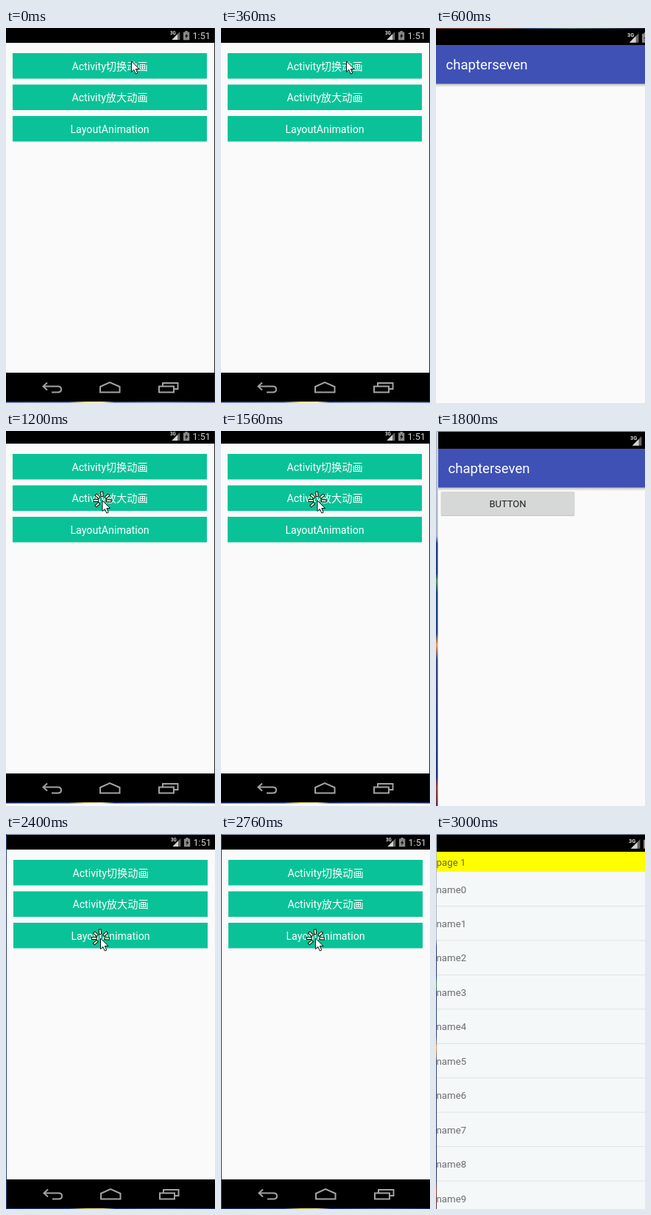
Animation of 284 by 507 pixels, one loop 3.6 s. Source, as an HTML page:

```html
<!DOCTYPE html>
<html lang="zh">
<head>
<meta charset="utf-8">
<title>Activity animations</title>
<style>
html, body { margin: 0; width: 100%; height: 100%; overflow: hidden; background: #fafafa; }
svg { display: block; width: 284px; height: 507px; }
text { font-family: Roboto, "Noto Sans CJK SC", "Noto Sans CJK", sans-serif; white-space: pre; }
.scene { visibility: hidden; }
</style>
</head>
<body>
<svg id="stage" viewBox="0 0 284 507">
  <defs>
    <linearGradient id="shade" x2="0" y2="1">
      <stop stop-color="#777"/>
      <stop offset=".3" stop-color="#ccc"/>
      <stop offset="1" stop-color="#fafafa"/>
    </linearGradient>
    <linearGradient id="wallH">
      <stop stop-color="#16306e"/>
      <stop offset=".3" stop-color="#24417f"/>
      <stop offset=".38" stop-color="#e4d36a"/>
      <stop offset=".46" stop-color="#e4d9a0"/>
      <stop offset=".52" stop-color="#1c3676"/>
      <stop offset=".76" stop-color="#3d5796"/>
      <stop offset="1" stop-color="#16306e"/>
    </linearGradient>
    <linearGradient id="wallTop">
      <stop stop-color="#7a4a3c"/>
      <stop offset=".3" stop-color="#8a4a38"/>
      <stop offset=".45" stop-color="#3b5f86"/>
      <stop offset=".65" stop-color="#4d7f90"/>
      <stop offset="1" stop-color="#1c2a4c"/>
    </linearGradient>
    <linearGradient id="wallV" x2="0" y2="1">
      <stop stop-color="#b9bfd0"/>
      <stop offset=".28" stop-color="#a9b2c8"/>
      <stop offset=".3" stop-color="#203a80"/>
      <stop offset=".38" stop-color="#203a80"/>
      <stop offset=".4" stop-color="#4f9a5c"/>
      <stop offset=".43" stop-color="#24407f"/>
      <stop offset=".54" stop-color="#24407f"/>
      <stop offset=".57" stop-color="#f0a050"/>
      <stop offset=".61" stop-color="#30487f"/>
      <stop offset=".92" stop-color="#1c3474"/>
      <stop offset=".95" stop-color="#a03c3c"/>
      <stop offset="1" stop-color="#5a2c48"/>
    </linearGradient>
  </defs>
</svg>
<script>
const STEP = 600;
const stage = document.getElementById('stage');

const rect = (x, y, w, h, fill, extra = '') =>
  `<rect x="${x}" y="${y}" width="${w}" height="${h}" fill="${fill}" ${extra}/>`;
const path = (d, attrs) => `<path d="${d}" ${attrs}/>`;
const text = (x, y, size, fill, str, extra = '') =>
  `<text x="${x}" y="${y}" font-size="${size}" fill="${fill}" ${extra}>${str}</text>`;
const at = (x, y, body, scale = 1) =>
  `<g transform="translate(${x} ${y}) scale(${scale})">${body}</g>`;

// Status icons, measured from the left edge of "3G"
const signal =
  text(0, 5.6, 6.6, '#ddd', '3G', 'font-weight="700" textLength=""') +
  path('M2.5 12.5L14 1V12.5Z', 'fill="#666"') +
  path('M2.5 12.5L10.5 4.5V12.5Z', 'fill="#d4d4d4"');
const battery =
  path('M2.5 0H6V1.5H8.5V12.5H0V1.5H2.5Z', 'fill="#8a8a8a"') +
  path('M5.5 3L2 7.5H4L3 11L6.8 6.3H4.7Z', 'fill="#111"');

const nav = at(0, 466,
  rect(0, 0, 283, 39, '#000') +
  `<g fill="none" stroke="#a2a2a2" stroke-width="2">` +
  path('M56 13.5L50.5 18.5L56 23.5M51 18.5H70.5Q75 18.5 75 22.5Q75 26.5 70.5 26.5H62', '') +
  path('M128 26.5V19L141 13L154.500 19V26.500Z', '') +
  path('M208 18.500H228V26.500H208ZM213 18V14H233.500V22H229', '') +
  '</g>');

const button = (y, label) =>
  rect(9, y, 264, 34.5, '#0ac298') +
  text(141, y + 22.5, 14.2, '#fff', label, 'text-anchor="middle"');

const arrow = path('M0 0V14.5L3.3 11.4L5.8 17L8.200 16L5.800 10.500H10.500Z',
  'fill="#fff" stroke="#111" stroke-width="1"');

function rays() {
  const angles = [180, 222, 266, 318, 2, 140];
  return angles.map(a =>
    `<g transform="rotate(${a})">` +
    rect(5.5, -1.5, 6.5, 3, '#fff2c4', 'stroke="#111" stroke-width="1"') + '</g>').join('');
}

function home(dx, dy, cursor) {
  return at(dx, dy,
    rect(0, 0, 284, 20, '#000') +
    rect(0, 20, 283, 446, '#fafafa') +
    rect(0, 20, 283, 1, '#e2e2e2') +
    at(223, 4, signal, .95) +
    at(241, 4, battery, .97) +
    text(253.5, 15, 12.6, '#d0d0d0', '1:51') +
    button(34, 'Activity切换动画') +
    button(76.5, 'Activity放大动画') +
    button(119, 'LayoutAnimation') +
    nav +
    rect(283, 0, 1, 505, '#222') +
    rect(0, 505, 284, 1.5, 'url(#wallH)')) + cursor;
}

const statusBar = (x, top, bottom, icons) =>
  rect(x, top, 284 - x, bottom - top, '#000') +
  at(icons, top + 5, signal, 1.1) +
  at(icons + 20, top + 5, battery, 1.1);

const titleBar = (x, y) =>
  rect(x, y, 284 - x, 52, '#3f51b5') +
  rect(x, y + 52, 284 - x, 5, 'url(#shade)') +
  text(x + 13.5, y + 33, 18.6, '#fff', 'chapterseven');

function list() {
  let rows = '';
  for (let i = 0; i < 10; i++) {
    const y = 51 + i * 46.45;
    rows += text(.5, y + 28.5, 13.3, '#6c6e6e', 'name' + i) +
      rect(1, y + 46, 283, 1, '#e0e3e3');
  }
  return rows;
}

const scenes = [
  home(0, 0, at(170.5, 45, arrow)),

  rect(0, 0, 284, 507, '#fafafa') + statusBar(0, 1, 23, 260) +
    rect(0, 0, 284, 1, 'url(#wallTop)') + titleBar(0, 23),

  home(0, -3, at(131, 94, rays() + arrow)),

  rect(0, 0, 284, 507, '#fafafa') + rect(0, 0, 284, 1, '#9aa4b8') +
    statusBar(3, 1, 24, 264) + rect(0, 0, 2.5, 507, 'url(#wallV)') +
    titleBar(3, 24) +
    rect(6.5, 82, 182, 32.5, '#d6d7d7', 'rx="1.5"') +
    rect(7, 114, 181, 1, '#c4c5c5') +
    text(97.5, 103, 13, '#222', 'BUTTON', 'text-anchor="middle"'),

  rect(0, 0, 284, 1, '#aab4c8') + home(1, 1, at(128.5, 141, rays() + arrow)) +
    rect(0, 0, 1, 507, '#2a3f78'),

  rect(0, 0, 284, 507, '#f5f8f8') + rect(0, 0, 284, 1, '#8c98ac') +
    statusBar(1, 1, 24, 262) + rect(1, 24, 283, 27, '#ff0') +
    rect(0, 0, 1, 507, 'url(#wallV)') +
    text(.5, 42.5, 13.3, '#6a6a20', 'page 1') + list()
];

stage.insertAdjacentHTML('beforeend',
  scenes.map(s => `<g class="scene">${s.replace(/ textLength=""/g, '')}</g>`).join(''));
const groups = [...stage.querySelectorAll('.scene')];

const start = performance.now();
function draw(now) {
  const t = Math.max(0, now - start) % (STEP * groups.length);
  const current = Math.floor(t / STEP);
  groups.forEach((g, i) => { g.style.visibility = i === current ? 'visible' : 'hidden'; });
  requestAnimationFrame(draw);
}
draw(start);
</script>
</body>
</html>
```
